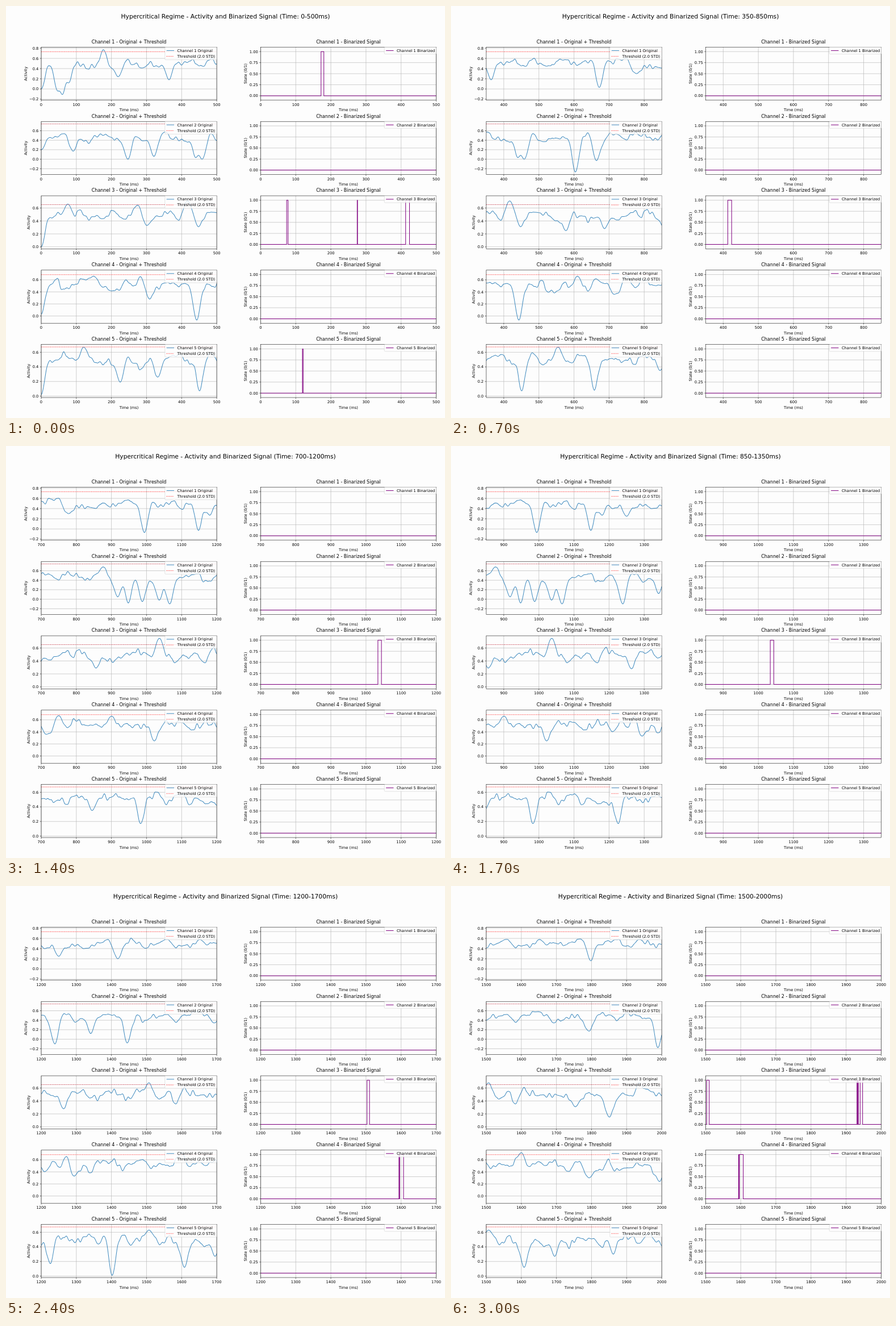
Animation of 773 by 725 pixels, one loop 3.1 s. Source, as an HTML page with a canvas:

```html
<!DOCTYPE html>
<html lang="en">
<head>
<meta charset="utf-8">
<title>Activity and Binarized Signal</title>
<style>
  html, body { margin: 0; width: 100%; height: 100%; overflow: hidden; background: #fdfdfd; }
  canvas { display: block; }
</style>
</head>
<body>
<canvas id="stage" width="773" height="725"></canvas>
<script>
const ctx = document.getElementById('stage').getContext('2d');
const LOOP = 3100, STEP = 100, SHIFT = 50, SPAN = 500;
const WIDTH = 309.1, HEIGHT = 93.4, LEFT = 62, RIGHT = 448.4, TOP = 72.4, PITCH = 130.8;
const SMALL = 6.71, MEDIUM = 8.05, LARGE = 10.73;
const BLUE = 'rgba(31,119,180,.85)', RED = '#ff0000', DARK_RED = '#b40014', PURPLE = '#800080';
const DOTS = [1.006, 1.66];

// Extremes are time (ms) and value (hundredths) pairs; pulses are [start, end] in ms.
const channels = [
  {
    low: -.22, high: .82, firstTick: -2, threshold: .731, tone: RED, level: .5,
    pulses: [[172, 180]],
    extremes: [0, 0, 46, 0, 62, -16, 78, 12, 177, 77, 219, 24, 364, 18, 672, 3, 778, 30,
      994, -7, 1148, -3, 1180, 27, 1250, 25, 1418, 20, 1798, 16]
  },
  {
    low: -.323, high: .795, firstTick: -2, threshold: .744, tone: DARK_RED, level: .46,
    pulses: [],
    extremes: [0, 20, 91, 17, 247, 0, 321, 6, 440, 4, 458, 0, 604, -27, 664, -3, 876, 68, 918, 5,
      948, -8, 988, -5, 1036, -2, 1066, -10, 1239, -10, 1341, 12, 1445, -8, 1793, 17, 1989, -18]
  },
  {
    low: -.031, high: .788, firstTick: 0, threshold: .653, tone: DARK_RED, level: .48,
    pulses: [[74, 78], [275, 276], [413, 424], [1034, 1044], [1503, 1510], [1931, 1932], [1934, 1935], [1940, 1947]],
    extremes: [0, 0, 76, 66, 276, 65, 301, 33, 417, 71, 448, 31, 577, 25, 687, 28, 856, 29,
      1037, 75, 1264, 28, 1507, 68, 1754, 31, 1851, 15, 1936, 68]
  },
  {
    low: -.12, high: .761, firstTick: 0, threshold: .685, tone: RED, level: .5,
    pulses: [[1594, 1595], [1596, 1607]],
    extremes: [0, 3, 149, 66, 283, 66, 309, 28, 443, -7, 610, 66, 715, 36, 750, 67, 901, 66,
      1022, 25, 1274, 68, 1294, 33, 1600, 72, 1793, 30, 1994, 24]
  },
  {
    low: -.02, high: .707, firstTick: 0, threshold: .673, tone: RED, level: .49,
    pulses: [[119, 121]],
    extremes: [0, 2, 121, 67, 225, 19, 332, 26, 451, 7, 555, 67, 658, 8, 845, 35, 983, 17,
      1226, 17, 1402, 1, 1507, 63, 1608, 12, 1695, 27, 1862, 30]
  }
];

// Smooth seeded noise between -1 and 1.
function noise(x, seed) {
  const random = n => {
    const r = Math.sin(n * 127.1 + seed * 311.7) * 43758.5;
    return 2 * (r - Math.floor(r)) - 1;
  };
  const i = Math.floor(x), u = x - i, ease = u * u * (3 - 2 * u);
  return random(i) + (random(i + 1) - random(i)) * ease;
}

// A wandering level, pulled to each extreme near its time.
function signalAt({ level, extremes }, time, seed) {
  let value = level + .05 * noise(time / 8, seed) + .09 * noise(time / 22, seed + 9);
  for (let i = 0; i < extremes.length; i += 2) {
    const weight = Math.exp(-(((time - extremes[i]) / 13) ** 2));
    value += (extremes[i + 1] / 100 - value) * weight;
  }
  return value;
}

function text(str, x, y, size, align = 'center') {
  ctx.font = `${size}px "DejaVu Sans", sans-serif`;
  ctx.textAlign = align;
  ctx.fillStyle = '#000';
  ctx.fillText(str, x, y);
}

function verticalText(str, x, y) {
  ctx.save();
  ctx.translate(x, y);
  ctx.rotate(-Math.PI / 2);
  text(str, 0, 2.4, SMALL);
  ctx.restore();
}

function line(points, color, width, dash = []) {
  ctx.beginPath();
  points.forEach(([x, y]) => ctx.lineTo(x, y));
  ctx.strokeStyle = color;
  ctx.lineWidth = width;
  ctx.setLineDash(dash);
  ctx.stroke();
  ctx.setLineDash([]);
}

function legend(right, top, entries) {
  const height = 2 + entries.length * 10.1;
  ctx.beginPath();
  ctx.roundRect(right - 91.3, top, 91.3, height, 1.3);
  ctx.fillStyle = 'rgba(255,255,255,.8)';
  ctx.fill();
  ctx.strokeStyle = 'rgba(204,204,204,.8)';
  ctx.lineWidth = .67;
  ctx.stroke();
  entries.forEach(([label, color, dash], i) => {
    const y = top + 6 + i * 10.1, x = right - 88.4;
    line([[x, y], [x + 13.4, y]], color, 1, dash);
    text(label, x + 18.8, y + 2.3, SMALL, 'left');
  });
}

function panel({ left, top, start, title, yLabel, labelX, low, high, ticks, digits, curves, entries }) {
  const xAt = t => left + (t - start) / SPAN * WIDTH;
  const yAt = v => top + (high - v) / (high - low) * HEIGHT;
  const bottom = top + HEIGHT, right = left + WIDTH;

  for (let t = Math.ceil(start / 100) * 100; t <= start + SPAN; t += 100) {
    const x = xAt(t);
    line([[x, top], [x, bottom]], '#b0b0b0', .6);
    line([[x, bottom], [x, bottom + 2.35]], '#000', .54);
    text(t, x, bottom + 10, SMALL);
  }
  for (const v of ticks) {
    const y = yAt(v);
    line([[left, y], [right, y]], '#b0b0b0', .6);
    line([[left - 2.35, y], [left, y]], '#000', .54);
    text(v.toFixed(digits).replace('-', '\u2212'), left - 4.7, y + 2.45, SMALL, 'right');
  }

  ctx.save();
  ctx.beginPath();
  ctx.rect(left, top, WIDTH, HEIGHT);
  ctx.clip();
  ctx.lineJoin = 'round';
  for (const { points, color, dash } of curves)
    line(points.map(([t, v]) => [xAt(t), yAt(v)]), color, 1.006, dash);
  ctx.restore();

  ctx.strokeStyle = '#000';
  ctx.lineWidth = .54;
  ctx.strokeRect(left, top, WIDTH, HEIGHT);
  legend(right, top, entries);
  text(title, left + WIDTH / 2, top - 6.7, MEDIUM);
  text('Time (ms)', left + WIDTH / 2, bottom + 19.6, SMALL);
  verticalText(yLabel, labelX, top + HEIGHT / 2);
}

function drawChannel(channel, index, start) {
  const name = `Channel ${index + 1}`, top = TOP + index * PITCH, end = start + SPAN;
  const { low, high, firstTick, threshold, tone, pulses } = channel;

  const ticks = [];
  for (let n = firstTick; n / 10 < high; n += 2) ticks.push(n / 10);
  const trace = [];
  for (let t = start; t <= end; t += 2) trace.push([t, signalAt(channel, t, index + 1)]);
  panel({
    left: LEFT, top, start, low, high, ticks, digits: 1,
    title: `${name} - Original + Threshold`,
    yLabel: 'Activity', labelX: firstTick < 0 ? 34.3 : 40,
    curves: [
      { points: trace, color: BLUE },
      { points: [[start, threshold], [end, threshold]], color: tone, dash: DOTS }
    ],
    entries: [[`${name} Original`, BLUE], ['Threshold (2.0 STD)', RED, DOTS]]
  });

  const steps = [[-10, 0], ...pulses.flatMap(([a, b]) => [[a, 0], [a, 1], [b, 1], [b, 0]]), [2010, 0]];
  panel({
    left: RIGHT, top, start, low: -.1, high: 1.1, ticks: [0, .25, .5, .75, 1], digits: 2,
    title: `${name} - Binarized Signal`,
    yLabel: 'State (0/1)', labelX: 422,
    curves: [{ points: steps, color: PURPLE }],
    entries: [[`${name} Binarized`, PURPLE]]
  });
}

function draw() {
  const start = Math.floor(performance.now() % LOOP / STEP) * SHIFT;
  ctx.fillStyle = '#fdfdfd';
  ctx.fillRect(0, 0, 773, 725);
  text(`Hypercritical Regime - Activity and Binarized Signal (Time: ${start}-${start + SPAN}ms)`, 386.5, 22.3, LARGE);
  channels.forEach((channel, i) => drawChannel(channel, i, start));
  requestAnimationFrame(draw);
}
draw();
</script>
</body>
</html>
```
